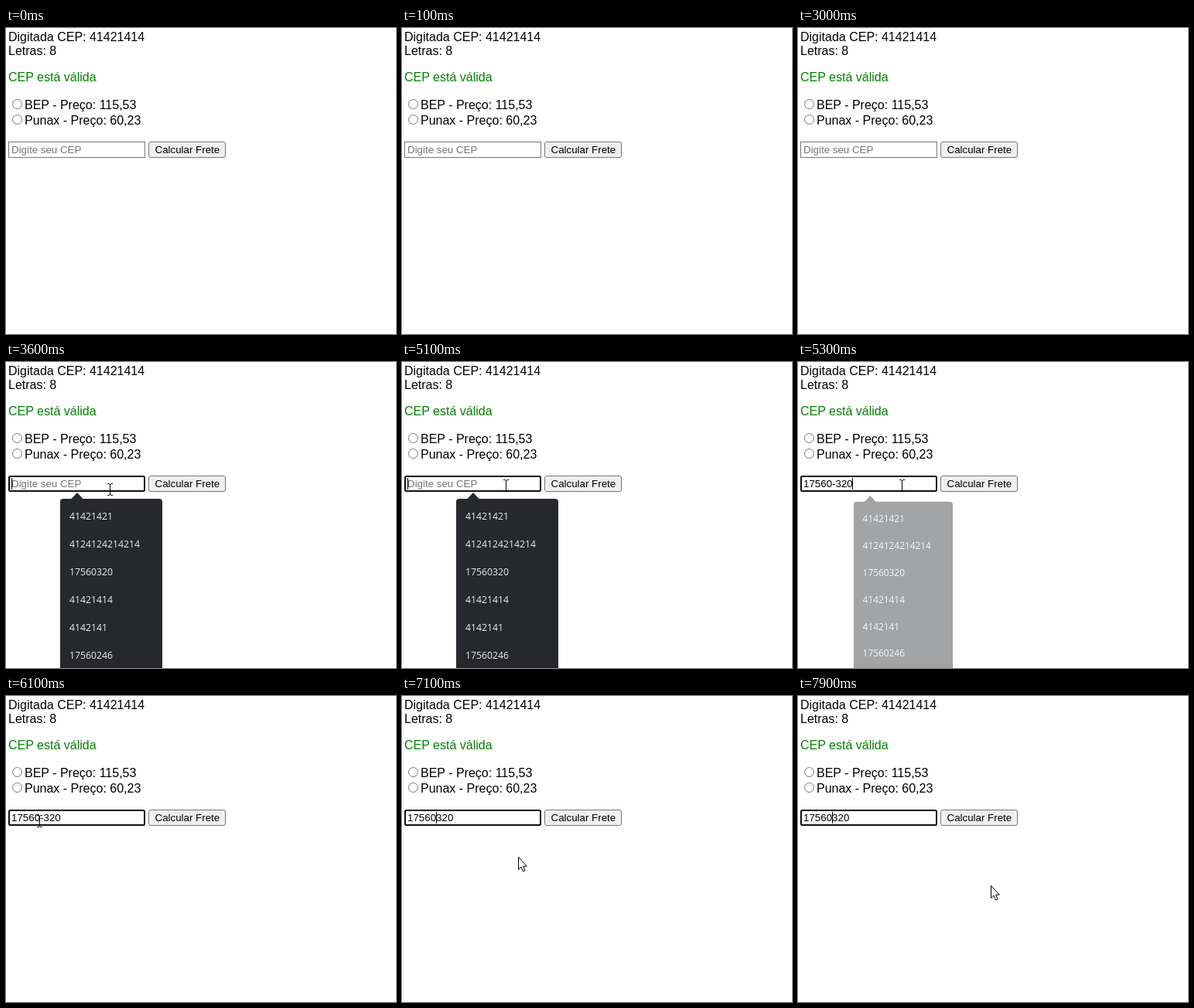
These frames come from a looping animation (504x396 px, 8 s). An HTML page:

```html
<!DOCTYPE html>
<html lang="pt">
<head>
<meta charset="utf-8">
<title>Calcular frete</title>
<style>
  html, body { margin: 0; width: 100%; height: 100%; overflow: hidden; background: #fff; }
  svg { display: block; width: 504px; height: 396px; }
  text { font: 16px "Liberation Sans", Arial, sans-serif; white-space: pre; }
  .small { font-size: 13.333px; }
  .item { font: 12.25px "Open Sans", "Noto Sans", sans-serif; fill: #eceef0; }
</style>
</head>
<body>
<svg viewBox="0 0 504 396">
  <text x="3" y="17">Digitada CEP: 41421414</text>
  <text x="3" y="35">Letras: 8</text>
  <text x="3" y="69" fill="green">CEP está válida</text>
  <g fill="#fff" stroke="#767676">
    <circle cx="14.5" cy="98.5" r="6"/>
    <circle cx="14.5" cy="118.5" r="6"/>
    <rect id="border" x="3.5" y="147.5" width="176" height="20"/>
    <rect x="184.5" y="147.5" width="99" height="20" rx="2.5" fill="#efefef"/>
  </g>
  <text x="24" y="105">BEP - Preço: 115,53</text>
  <text x="24" y="125">Punax - Preço: 60,23</text>
  <rect id="focus" x="4" y="148" width="175" height="19" rx="1.5" fill="#fff" stroke="#101010" stroke-width="2"/>
  <text id="value" class="small" x="7" y="162"></text>
  <text class="small" x="192.5" y="162">Calcular Frete</text>
  <rect id="caret" y="150" width="1" height="15"/>
  <g id="list">
    <path d="M84 177.5L92 169L100 177.5Z" fill="#27282c"/>
    <rect x="70" y="177" width="132" height="240" rx="4" fill="#27282c"/>
    <rect x="70" y="392.5" width="132" height="24" fill="#2a2226"/>
  </g>
  <path id="beam" d="M-3 -7.5H-1L.5 -6.5L2 -7.5H4M.5 -7V7M-3 7.5H-1L.5 6.5L2 7.5H4" fill="none" stroke="#000"/>
  <path id="arrow" d="M.5 .5V16.5L4 13.2L6.5 19L9 18L6.6 12.2H11.3Z" fill="#fff" stroke="#000"/>
</svg>
<script>
const LOOP = 8000, STEP = 100;
const $ = id => document.getElementById(id);
const show = (id, on) => $(id).setAttribute("visibility", on ? "visible" : "hidden");
const within = (t, spans) => spans.some(([a, b]) => t >= a && t < b);

["41421421", "4124124214214", "17560320", "41421414", "4142141", "17560246"].forEach((code, i) => {
  const item = document.createElementNS("http://www.w3.org/2000/svg", "text");
  item.setAttribute("class", "item");
  item.setAttribute("x", 82);
  item.setAttribute("y", 204 + 36 * i);
  item.textContent = code;
  $("list").append(item);
});

// Pointer stops: time, x, y
const path = [
  [3100, 264, 196], [3200, 234, 176], [3300, 165, 168], [3400, 136, 165], [3500, 134, 165],
  [4200, 134, 165], [4300, 134, 160], [5600, 134, 160], [5700, 130, 160], [5900, 82, 162],
  [6000, 52, 163], [6100, 43, 162], [6800, 43, 162], [6900, 54, 163], [7000, 92, 164],
  [7100, 150, 208], [7200, 196, 249], [7300, 221, 251], [7400, 246, 251], [7600, 250, 246],
  [7700, 250, 246], [7800, 249, 245], [LOOP, 249, 245]
];
const pointerSpans = [[3100, 6600], [6900, LOOP]];
const beamSpans = [[3300, 7100]];
const caretSpans = [[3500, 4100], [4700, 5800], [6300, 7200], [7800, LOOP]];

function pointerAt(t) {
  const i = Math.max(1, path.findIndex(p => p[0] > t));
  const [a, b] = [path[i - 1], path[i]];
  const k = Math.max(0, (t - a[0]) / (b[0] - a[0]));
  return [a[1] + (b[1] - a[1]) * k, a[2] + (b[2] - a[2]) * k].map(Math.round);
}

function listOpacity(t) {
  if (t < 3500 || t >= 5400) return 0;
  if (t < 3600) return 0.5;
  if (t < 5200) return 1;
  return t < 5300 ? 0.9 : 0.42;
}

function draw(ms) {
  const t = Math.floor(ms / STEP) * STEP;
  const focused = t >= 3500, typed = t >= 5200;
  show("border", !focused);
  show("focus", focused);

  $("value").textContent = !typed ? "Digite seu CEP" : t < 6600 ? "17560-320" : "17560320";
  $("value").setAttribute("fill", typed ? "#000" : "#757575");
  $("caret").setAttribute("x", !typed ? 7 : t < 6300 ? 70 : 44);
  show("caret", within(t, caretSpans));

  const alpha = listOpacity(t);
  const scale = 1 - 0.03 * Math.min(1, (1 - alpha) / 0.58);
  $("list").setAttribute("opacity", alpha);
  $("list").setAttribute("transform", `translate(136 300) scale(${scale}) translate(-136 -300)`);

  const visible = within(t, pointerSpans), beam = within(t, beamSpans);
  const place = `translate(${pointerAt(t).join(" ")})`;
  $("beam").setAttribute("transform", place);
  $("arrow").setAttribute("transform", place);
  show("beam", visible && beam);
  show("arrow", visible && !beam);
}

const start = performance.now();
function tick() {
  draw((performance.now() - start) % LOOP);
  requestAnimationFrame(tick);
}
tick();
</script>
</body>
</html>
```
